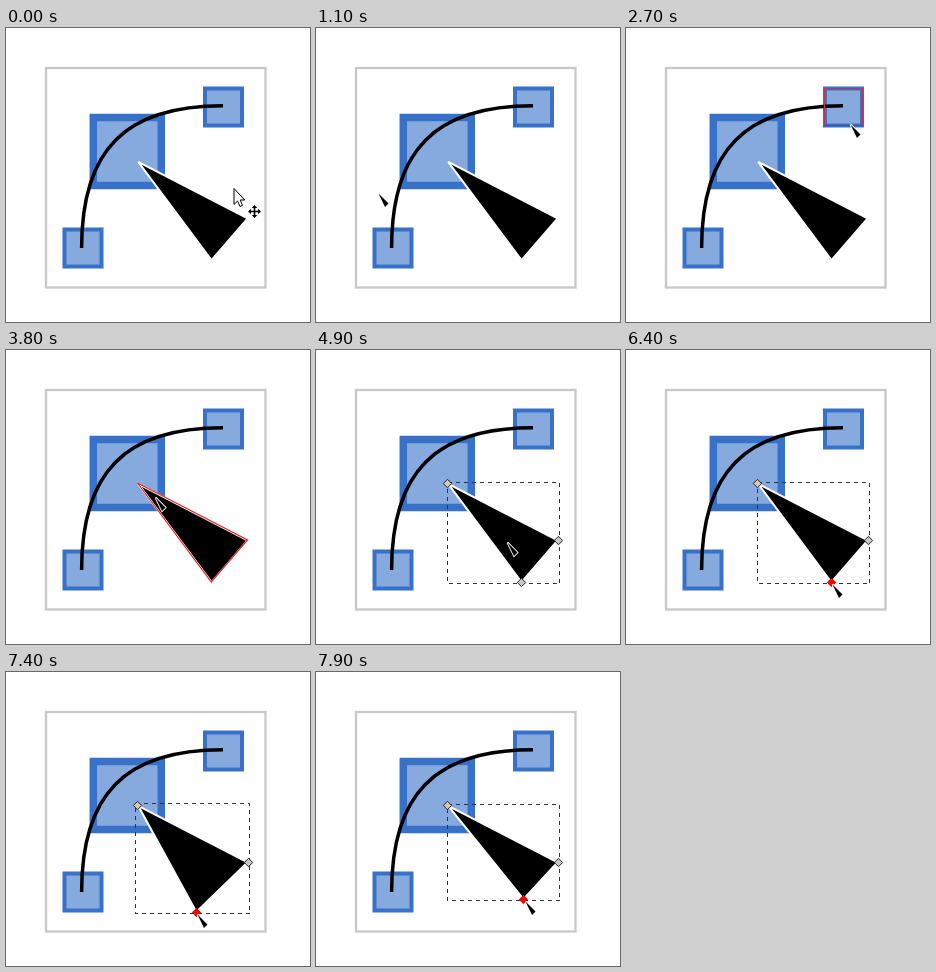
Write an HTML page that moves like this. It is 304 by 294 pixels and loops after 8 s.

```html
<!DOCTYPE html>
<html lang="en">
<head>
<meta charset="utf-8">
<title>Node editing</title>
<style>
  html, body { margin: 0; width: 100%; height: 100%; overflow: hidden; background: #fff; }
  svg { display: block; width: 304px; height: 294px; }
  .box { fill: #87aade; stroke: #3771c8; }
  .line { fill: none; stroke: #f02020; stroke-width: 1.2; }
  .node { fill: #c8c8c8; stroke: #222; }
  .hot { fill: #f00; stroke: #c00; }
</style>
</head>
<body>
<svg viewBox="0 0 304 294">
  <defs>
    <path id="arc" d="M75.6 220C75.6 122 119 77.8 217 77.8"/>
    <path id="diamond" d="M0-4.2L4.2 0L0 4.2L-4.2 0z"/>
  </defs>

  <rect id="frame" x="40" y="40" width="219.5" height="219.5" fill="#fff" stroke="#c8c8c8" stroke-width="2.3"/>
  <rect class="box" x="87.3" y="89.5" width="68" height="68" stroke-width="7.5"/>
  <rect class="box" x="199" y="60.5" width="37" height="37" stroke-width="4"/>
  <rect class="box" x="58.5" y="201.5" width="37" height="37" stroke-width="4"/>
  <use href="#arc" fill="none" stroke="#000" stroke-width="3.5"/>
  <path id="wedge" stroke="#fff" stroke-width="2"/>

  <g id="hiFrame" class="hi">
    <path class="line" d="M39.5 260V39.5H260" style="stroke:#c2505c"/>
    <path class="line" d="M39.5 259.5H259.5V39.5" style="stroke:#555"/>
  </g>
  <rect id="hiBig" class="hi line" x="87.5" y="89.5" width="68" height="68"/>
  <g id="hiSmall" class="hi">
    <path class="line" d="M198.5 98V60.5H236.5V98" style="stroke:#c83250"/>
    <path class="line" d="M198 97.5H237" style="stroke:#4a4a9c"/>
  </g>
  <use id="hiArc" class="hi line" href="#arc"/>
  <path id="hiWedge" class="hi line" d="M131.5 133L241.5 190L205.3 232Z"/>

  <g id="handles">
    <rect id="bounds" fill="none" stroke="#333" stroke-dasharray="4 4" shape-rendering="crispEdges"/>
    <use class="node" href="#diamond" x="131.5" y="133.5" style="fill:#d6c8b0"/>
    <use class="node" href="#diamond" x="242.5" y="190.5"/>
    <use id="grip" href="#diamond"/>
  </g>

  <g id="arrow">
    <path d="M228 160.5V176.5L231.6 173L234 178.5L236.5 177.4L234.2 172H238.8Z" fill="#fff" stroke="#000"/>
    <path d="M248.5 177l2.8 3h-2v2.7h2.7v-2l3 2.8l-3 2.8v-2h-2.7v2.7h2l-2.8 3l-2.8-3h2v-2.7h-2.7v2l-3-2.8l3-2.8v2h2.7v-2.7h-2z"/>
  </g>
  <path id="pointer" d="M.5.5L10.5 10.5L7 14Z" stroke="#fff" stroke-width="1.8" paint-order="stroke"/>
</svg>
<script>
const LOOP = 8000, STEP = 100, HALF = 1;
const TIP = [132.2, 133.8], SIDE = [241.6, 190.3];

// A track starts at a point and glides to each stop, optionally bowing off the straight line
const pointerTrack = {
  start: [241, 175],
  moves: [
    { from: 800, until: 1100, to: [62, 165], bow: [0, -65] },
    { from: 2100, until: 2700, to: [224, 96] },
    { from: 2700, until: 2900, to: [185, 72] },
    { from: 3000, until: 3800, to: [149, 147], bow: [-25, 0] },
    { from: 3800, until: 4700, to: [191, 192] },
    { from: 5200, until: 5500, to: [206, 234] }
  ]
};
const gripTrack = {
  start: [205.5, 232.2],
  moves: [
    { from: 6300, until: 7100, to: [190, 240.3] },
    { from: 7300, until: 7900, to: [207.5, 227.2] }
  ]
};
// Item outlined from each time on
const hovers = [
  [2200, 'hiFrame'], [2300, 'hiBig'], [2500, 'hiFrame'], [2600, 'hiSmall'], [2900, ''],
  [3100, 'hiArc'], [3400, 'hiBig'], [3700, 'hiWedge'], [4200, '']
];

const $ = id => document.getElementById(id);
const show = (el, on) => el.setAttribute('visibility', on ? 'visible' : 'hidden');
const place = (id, [x, y]) => $(id).setAttribute('transform', `translate(${x} ${y})`);
const snap = v => Math.floor(v) + .5;
const ease = p => p < .5 ? 4 * p ** 3 : 1 - 4 * (1 - p) ** 3;

function follow({ start, moves }, t) {
  return moves.reduce((pos, { from, until, to, bow = [0, 0] }) => {
    const p = Math.min(1, Math.max(0, (t - from) / (until - from)));
    return pos.map((v, i) => v + (to[i] - v) * ease(p) + bow[i] * Math.sin(Math.PI * p));
  }, start);
}

function unit(from, to) {
  const dx = to[0] - from[0], dy = to[1] - from[1], d = Math.hypot(dx, dy);
  return [dx / d, dy / d];
}

// Outer stroke corners: mitred, or bevelled past the miter limit of 4
function corners(pts) {
  return pts.flatMap((v, i) => {
    const a = unit(v, pts[(i + 1) % 3]), b = unit(v, pts[(i + 2) % 3]);
    const sin = Math.hypot(a[0] - b[0], a[1] - b[1]) / 2;
    if (sin < 1 / 4) return [
      [v[0] + a[1] * HALF, v[1] - a[0] * HALF],
      [v[0] - b[1] * HALF, v[1] + b[0] * HALF]
    ];
    const sx = a[0] + b[0], sy = a[1] + b[1], k = HALF / sin / Math.hypot(sx, sy);
    return [[v[0] - sx * k, v[1] - sy * k]];
  });
}

function setBounds(pts) {
  const c = corners(pts), xs = c.map(p => p[0]), ys = c.map(p => p[1]);
  const x = snap(Math.min(...xs)), y = snap(Math.min(...ys));
  const size = { x, y, width: snap(Math.max(...xs)) - x, height: snap(Math.max(...ys)) - y };
  for (const k in size) $('bounds').setAttribute(k, size[k]);
}

function draw(t) {
  const grip = follow(gripTrack, t), pts = [TIP, SIDE, grip];
  $('wedge').setAttribute('d', 'M' + pts.join('L') + 'Z');
  setBounds(pts);
  place('grip', grip.map(snap));
  $('grip').setAttribute('class', t < 5500 ? 'node' : 'node hot');
  show($('handles'), t >= 4900);

  const tip = t < 6300 ? follow(pointerTrack, t) : [grip[0] + 1, grip[1] + 2];
  place('pointer', tip.map(Math.round));
  show($('arrow'), t < 600);
  show($('pointer'), t >= 600);

  const [, hover] = hovers.findLast(h => h[0] <= t) ?? [0, ''];
  document.querySelectorAll('.hi').forEach(el => show(el, el.id === hover));
  show($('frame'), hover !== 'hiFrame');
}

let start;
function tick(now) {
  start ??= now;
  draw(Math.floor((now - start) % LOOP / STEP) * STEP);
  requestAnimationFrame(tick);
}
draw(0);
requestAnimationFrame(tick);
</script>
</body>
</html>
```
